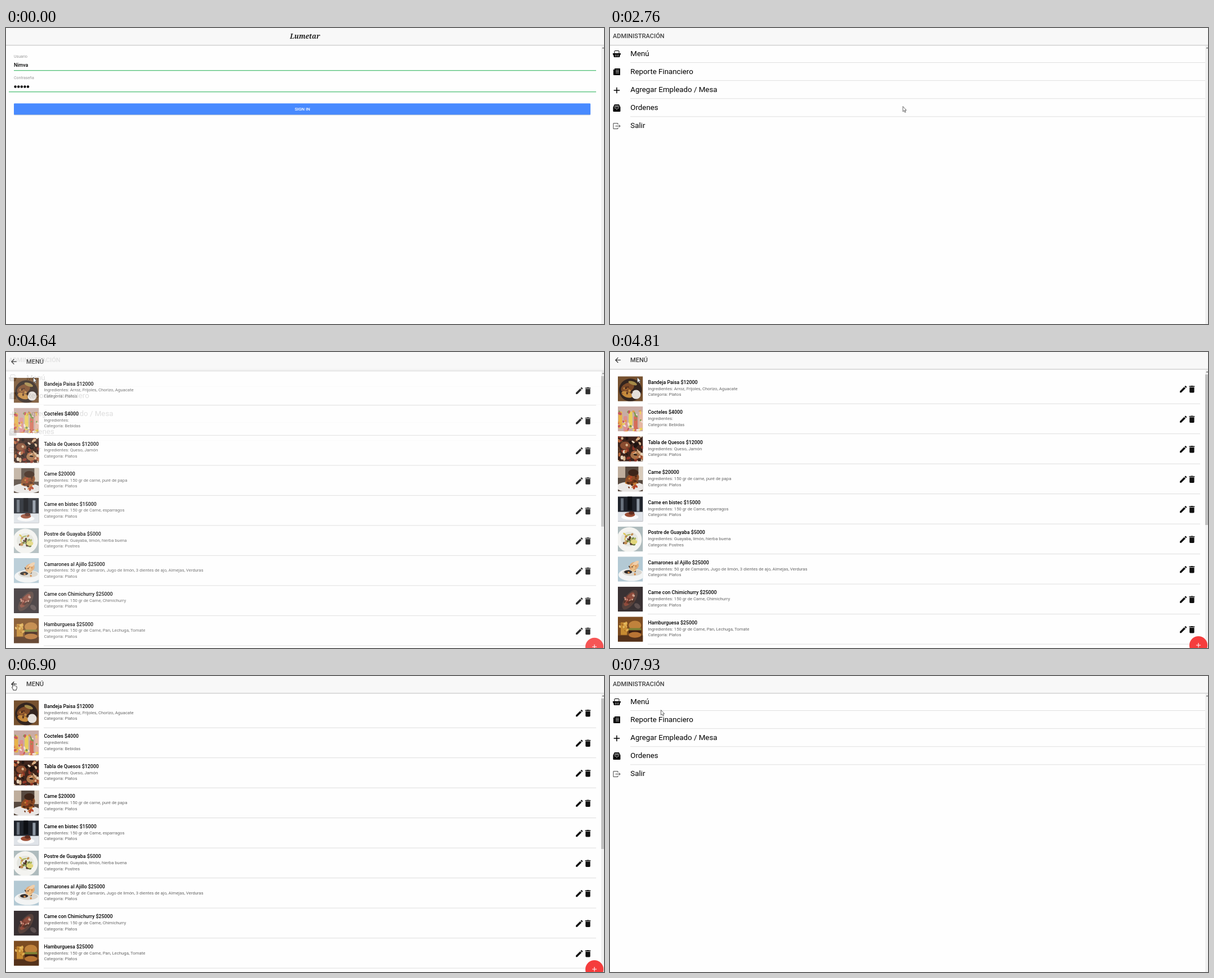
An HTML page that plays this animation: 1062x527 px, repeating every 8000 ms.

```html
<!DOCTYPE html>
<html lang="es">
<head>
<meta charset="utf-8">
<title>Restaurante</title>
<style>
html, body { margin: 0; width: 100%; height: 100%; overflow: hidden; background: #fff; }
svg { display: block; }
#stage { width: 100vw; height: 100vh; font-family: Roboto, sans-serif; }
.bar { font-size: 11.06px; font-weight: 500; fill: #424242; }
.brand { font: italic 700 12px "Noto Serif", serif; text-anchor: middle; fill: #222; }
.label { font-size: 7px; fill: #999; }
.value { font-size: 8.85px; font-weight: 500; }
.button { font-size: 7.74px; font-weight: 500; fill: #fff; text-anchor: middle; }
.option { font-size: 13.3px; }
.dish { font-size: 8.8px; font-weight: 500; }
.note { font-size: 7.74px; fill: #666; }
</style>
</head>
<body>
<svg id="stage" viewBox="0 0 1062 527">
  <g id="home"></g>
  <g id="login"></g>
  <g id="menu"></g>
  <circle id="halo" r="7" fill="#f5e100" fill-opacity=".62"/>
  <g id="cursor" stroke="#222" stroke-width=".9" stroke-linejoin="round" fill="#fff">
    <path id="arrow" d="M.5 .5V9.8L2.6 7.9 4.1 11.2 5.6 10.5 4.1 7.3H6.7Z" stroke="#555"/>
    <path id="hand" d="M-1 1Q-1 0 0 0T1 1V5Q2.3 4.3 2.8 5.4 4 4.9 4.5 6 6.2 5.7 6.2 7.3V9.5Q6.2 11 5.2 12V13.2H-.2V12L-2.4 8.6Q-2.8 7.2-1 7.8Z"/>
  </g>
</svg>
<script>
const $ = id => document.getElementById(id);
const LOOP = 8000;

// ---- drawing helpers ----
const rect = (x, y, w, h, fill, extra = '') =>
  `<rect x="${x}" y="${y}" width="${w}" height="${h}" fill="${fill}" ${extra}/>`;
const disc = (x, y, r, fill) => `<circle cx="${x}" cy="${y}" r="${r}" fill="${fill}"/>`;
const oval = (x, y, rx, ry, fill, turn = 0) =>
  `<ellipse cx="${x}" cy="${y}" rx="${rx}" ry="${ry}" fill="${fill}" transform="rotate(${turn} ${x} ${y})"/>`;
const text = (x, y, cls, str) => `<text x="${x}" y="${y}" class="${cls}">${str}</text>`;
const icon = (x, y, scale, d, fill = '#111') =>
  `<path transform="translate(${x} ${y}) scale(${scale})" d="${d}" fill="${fill}"/>`;

function frame(title, thumb = '') {
  return rect(0, 0, 1062, 570, '#fefefe') + rect(1057, 31, 5, 540, '#f1f1f1') + thumb +
    '<path d="M1058.5 36.5l2-2.5 2 2.5z" fill="#777"/>' +
    rect(0, 0, 1062, 30, '#f8f8f8') + rect(0, 30, 1062, 1, '#cdcdcd') +
    rect(0, 31, 1062, 1, '#ededed') + title;
}

// ---- login ----
function loginPage() {
  let dots = '';
  for (let i = 0; i < 5; i++) dots += disc(16.6 + 5.6 * i, 104.5, 2.2, '#000');
  const line = (x, y) => rect(x, y, 1048 - x, 1.3, '#52c078');
  return frame(text(531, 19, 'brand', 'Lumetar')) +
    text(14, 52.5, 'label', 'Usuario') + text(14, 69.3, 'value', 'Nimva') + line(14, 75) +
    text(14, 90.5, 'label', 'Contraseña') + dots + line(5, 113) +
    rect(14, 135.2, 1024, 20, '#b9c2d0', 'rx="1.3"') +
    rect(14, 134.3, 1024, 20, '#488aff', 'rx="1.3"') + text(526.3, 147.3, 'button', 'SIGN IN');
}

// ---- options ----
function homePage() {
  const names = ['Menú', 'Reporte Financiero', 'Agregar Empleado / Mesa', 'Ordenes', 'Salir'];
  const rows = names.map((name, i) =>
    text(36.3, 49.7 + 32.1 * i, 'option', name) +
    (i < 4 ? rect(36, 61 + 32.1 * i, 1021, 1, '#e0e0e0') : '')).join('');
  const icons =
    '<path d="M5 45H19V47.5H18L17 52H7L6 47.5H5Z"/>' +
    '<path d="M8 45V41.5Q8 40.5 9 40.5H15Q16 40.5 16 41.5V45" fill="none" stroke="#000"/>' +
    '<path d="M9.5 47V51M12 47V51M14.5 47V51" stroke="#fff" stroke-width=".7"/>' +
    '<path d="M8 72H18V84H7Q6 84 6 83V74H8Z"/>' +
    '<path d="M10 75H16M10 77.5H16M10 80H16" stroke="#fff" stroke-width=".8"/>' +
    '<path d="M12 105.7V116.3M6.7 111H17.3" stroke="#000" stroke-width="1.5"/>' +
    '<path d="M8 136H16L18.5 141V148Q18.5 149 17.5 149H6.5Q5.5 149 5.5 148V141Z"/>' +
    '<path d="M8.3 138.3H15.7M7.4 140.3H16.6M8 142.5H9.5Q12 146.5 14.5 142.5H16" stroke="#fff" stroke-width=".8" fill="none"/>' +
    '<path d="M14 172V169.7H6V179.5H14V177.3M9.5 174.6H18M15.8 172.3L18.2 174.6 15.8 176.9" stroke="#333" stroke-width=".9" fill="none"/>';
  return frame(text(5, 18.4, 'bar', 'ADMINISTRACIÓN')) + rows + icons;
}

// ---- dishes ----
let seed = 7;
const random = () => (seed = seed * 16807 % 2147483647) / 2147483647;

// Small blobs of food scattered around a centre.
function crumbs(n, colors, x, y, spread, size) {
  let out = '';
  for (let i = 0; i < n; i++) {
    out += oval(x + (random() - .5) * 2 * spread, y + (random() - .5) * 2 * spread,
      size * (.6 + random()), size * (.4 + random() * .6), colors[i % colors.length], random() * 180);
  }
  return out;
}

function glasses() {
  const fills = ['#e8b34a', '#dd8f90', '#e9cf5a', '#d56d58', '#e6b6a2'];
  return fills.map((c, i) => rect(1 + i * 9, 9 + i % 2 * 8, 6.5, 30, c, 'rx="2"')).join('');
}

const dishes = [
  ['Bandeja Paisa $12000', 'Arroz, Frijoles, Chorizo, Aguacate', 'Platos', '#76512f', () =>
    disc(22, 24, 20, '#33251f') + oval(17, 20, 12, 8, '#7d4a28', -25) + oval(16, 32, 10, 5, '#c68a3c', 20) +
    disc(32, 32, 8, '#e5e0da') + oval(26, 12, 8, 3, '#a58a48', 20) +
    crumbs(14, ['#a2642f', '#54301e', '#c58b42'], 17, 23, 9, 2)],
  ['Cocteles $4000', '', 'Bebidas', '#c8aca5', () =>
    glasses() + crumbs(34, ['#eed25c', '#f0dfd4', '#c9585c', '#7f9a4e', '#e39a4c'], 22, 24, 21, 2.4)],
  ['Tabla de Quesos $12000', 'Queso, Jamón', 'Platos', '#3d241c', () =>
    oval(13, 16, 9, 7, '#8a4c30') + oval(31, 33, 9, 7, '#a87348') +
    crumbs(56, ['#d9b48c', '#8d3526', '#1f1512', '#e6d3ba', '#b6683c', '#5d3a25'], 22, 22, 22, 2.8)],
  ['Carne $20000', '150 gr de carne, puré de papa', 'Platos', '#57493f', () =>
    rect(0, 0, 13, 20, '#bfae9d') + rect(36, 0, 8, 24, '#d8cbbb') + oval(22, 36, 25, 9, '#e9e6e4') +
    oval(25, 22, 13, 9, '#8c4c25', -30) + oval(27, 11, 9, 6, '#3c2418') +
    crumbs(18, ['#c77b32', '#6b3319', '#b4452a', '#4d2818'], 24, 26, 11, 2.6)],
  ['Carne en bistec $15000', '150 gr de Carne, esparragos', 'Platos', '#20242c', () =>
    rect(0, 27, 44, 17, '#dfe3e8') + rect(17, 0, 8, 24, '#0d0f13') + rect(5, 3, 5, 22, '#68717c') +
    rect(33, 4, 5, 22, '#8e98a4') + oval(21, 36, 15, 5, '#fafafa') +
    oval(21, 32, 9, 4, '#9a4d34') + oval(24, 29, 5, 3, '#5e2c20')],
  ['Postre de Guayaba $5000', 'Guayaba, limón, hierba buena', 'Postres', '#aebbbd', () =>
    disc(20, 23, 22, '#f3f3f0') + oval(20, 22, 15, 13, '#e5e6e0') +
    crumbs(24, ['#66783a', '#a9b45c', '#52352a', '#c08d52', '#ddc75a'], 20, 22, 10, 2.8) +
    oval(28, 27, 6, 4, '#e2d67a')],
  ['Camarones al Ajillo $25000', '50 gr de Camarón, Jugo de limón, 3 dientes de ajo, Almejas, Verduras', 'Platos', '#b3c9d4', () =>
    oval(24, 32, 23, 11, '#f2f4f4') + oval(25, 28, 17, 6, '#d9d6cf') + oval(28, 17, 9, 7, '#e2ac78', -30) +
    oval(31, 12, 7, 3, '#f0cfaa', -35) + oval(18, 27, 7, 3, '#312b28') +
    crumbs(12, ['#d58d4a', '#3a3431', '#ecc389'], 26, 24, 8, 2)],
  ['Carne con Chimichurry $25000', '150 gr de Carne, Chimichurry', 'Platos', '#393133', () =>
    oval(21, 23, 20, 9, '#57423c', -55) + oval(20, 22, 14, 6, '#8f4d3d', -55) + oval(34, 34, 6, 4, '#5d5050', 40) +
    crumbs(16, ['#b9796a', '#6d3229', '#d0a592', '#52362d'], 19, 22, 9, 2.3)],
  ['Hamburguesa $25000', '150 gr de Carne, Pan, Lechuga, Tomate', 'Platos', '#7c4c21', () =>
    rect(0, 33, 44, 11, '#54321b') + rect(5, 10, 11, 22, '#c68b32') + oval(30, 15, 11, 8, '#c0823c') +
    rect(19, 20, 22, 4, '#7c8135') + rect(19, 24, 22, 5, '#3c2013') + oval(30, 32, 11, 5, '#b87434') +
    crumbs(12, ['#dfab4e', '#a56722', '#e4ba62'], 10, 18, 7, 2)]
];

const PENCIL = 'M3 17.25V21h3.75L17.81 9.94l-3.75-3.75zM20.71 7.04a1 1 0 0 0 0-1.41l-2.34-2.34a1 1 0 0 0-1.41 0l-1.83 1.83 3.75 3.75z';
const TRASH = 'M6 19c0 1.1.9 2 2 2h8c1.1 0 2-.9 2-2V7H6zM19 4h-3.5l-1-1h-5l-1 1H5v2h14z';
const BACK = 'M20 11H7.83l5.59-5.59L12 4l-8 8 8 8 1.41-1.41L7.83 13H20z';

function menuPage() {
  const rows = dishes.map(([name, parts, kind, tone, art], i) =>
    `<g transform="translate(0 ${53.5 * i})">` +
    `<svg x="14" y="43.3" width="44.5" height="44.5" viewBox="0 0 44 44">${rect(0, 0, 44, 44, tone)}${art()}</svg>` +
    text(67.4, 56.8, 'dish', name) + text(67.4, 67.7, 'note', `Ingredientes: ${parts}`) +
    text(67.4, 78.2, 'note', `Categoría: ${kind}`) + rect(67, 91.6, 981, 1, '#dedede') +
    icon(1010, 58, .68, PENCIL) + icon(1025, 57.8, .7, TRASH) + '</g>').join('');
  const title = icon(6.5, 7, .62, BACK, '#333') + text(36, 18.4, 'bar', 'MENÚ');
  return frame(title, rect(1057, 40, 5, 268, '#c1c1c1')) + rows +
    disc(1045, 523, 16.3, '#d9d0d0') + disc(1045, 522, 16, '#f53d3d') +
    '<path d="M1041 522H1049M1045 518V526" stroke="#fff" stroke-width="1.1"/>';
}

$('login').innerHTML = loginPage();
$('home').innerHTML = homePage();
$('menu').innerHTML = menuPage();

// ---- timing ----
// Bursts of screen updates: first, last, count.
const bursts = [
  [0, 0, 1], [450, 1050, 9], [1370, 1370, 1], [1830, 1830, 1], [1990, 2080, 2], [2310, 2390, 2],
  [2760, 3530, 10], [3620, 3780, 3], [3920, 4010, 2], [4530, 4530, 1], [4640, 4870, 4],
  [5190, 5500, 5], [5960, 6360, 6], [6660, 6740, 2], [6900, 7150, 4], [7310, 7930, 9]
];
const ticks = bursts.flatMap(([a, b, n]) =>
  Array.from({ length: n }, (_, i) => n > 1 ? a + (b - a) * i / (n - 1) : a));
const lastTick = t => ticks.filter(k => k <= t + .01).pop();

// Pointer stops: time, x, y.
const stops = [
  [440, 970, 511], [900, 560, 114], [1050, 537, 145], [2300, 538, 144], [2680, 538, 144],
  [3400, 3, 0], [3530, 38, 36], [3780, 48, 44.5], [5110, 48, 44.5], [5500, 197, 195],
  [5880, 197, 195], [6100, 150, 315], [6280, 66, 119], [6660, 14, 21], [6740, 18, 24],
  [6900, 13, 12], [7390, 13, 12], [7930, 90, 60]
];
const within = (t, a, b) => t >= a && t < b;
const clamp = p => Math.min(1, Math.max(0, p));

function pointerAt(t) {
  const i = Math.max(1, stops.findIndex(s => s[0] >= t));
  const [t0, x0, y0] = stops[i - 1], [t1, x1, y1] = stops[i];
  const p = clamp((t - t0) / (t1 - t0)), e = p * p * (3 - 2 * p);
  return [x0 + (x1 - x0) * e, y0 + (y1 - y0) * e];
}

const enter = (t, a, b) => 1 - (1 - clamp((t - a) / (b - a))) ** 4.4;
const leave = (t, a, b) => 1 - clamp((t - a) / (b - a)) ** 1.8;

function place(page, shown) {
  page.setAttribute('opacity', shown);
  page.setAttribute('transform', `translate(0 ${22 * (1 - shown)})`);
}
const show = (node, on) => node.setAttribute('visibility', on ? 'visible' : 'hidden');

function draw(now) {
  const t = lastTick(now % LOOP);

  const home = $('home'), login = $('login');
  const top = t < 2390 ? home : login;
  if (top.nextElementSibling !== $('menu')) $('menu').before(top);
  show(login, t < 2390);
  place(home, enter(t, 2150, 2390));
  place($('menu'), t < 7290 ? enter(t, 4520, 4840) : leave(t, 7290, 7490));

  const [x, y] = pointerAt(t);
  const visible = t >= 450 && !within(t, 6359, 6660);
  const pointing = within(t, 1370, 2390) || within(t, 6900, 7380);
  $('cursor').setAttribute('transform', `translate(${x} ${y})`);
  show($('arrow'), visible && !pointing);
  show($('hand'), visible && pointing);

  const halo = $('halo');
  const clicked = within(t, 1830, 1990) || within(t, 3920, 4010) || within(t, 6980, 7150);
  show(halo, clicked);
  halo.setAttribute('cx', x + (pointing ? -.5 : .5));
  halo.setAttribute('cy', y + .5);
}

const start = performance.now();
function loop() {
  draw(performance.now() - start);
  requestAnimationFrame(loop);
}
loop();
</script>
</body>
</html>
```
